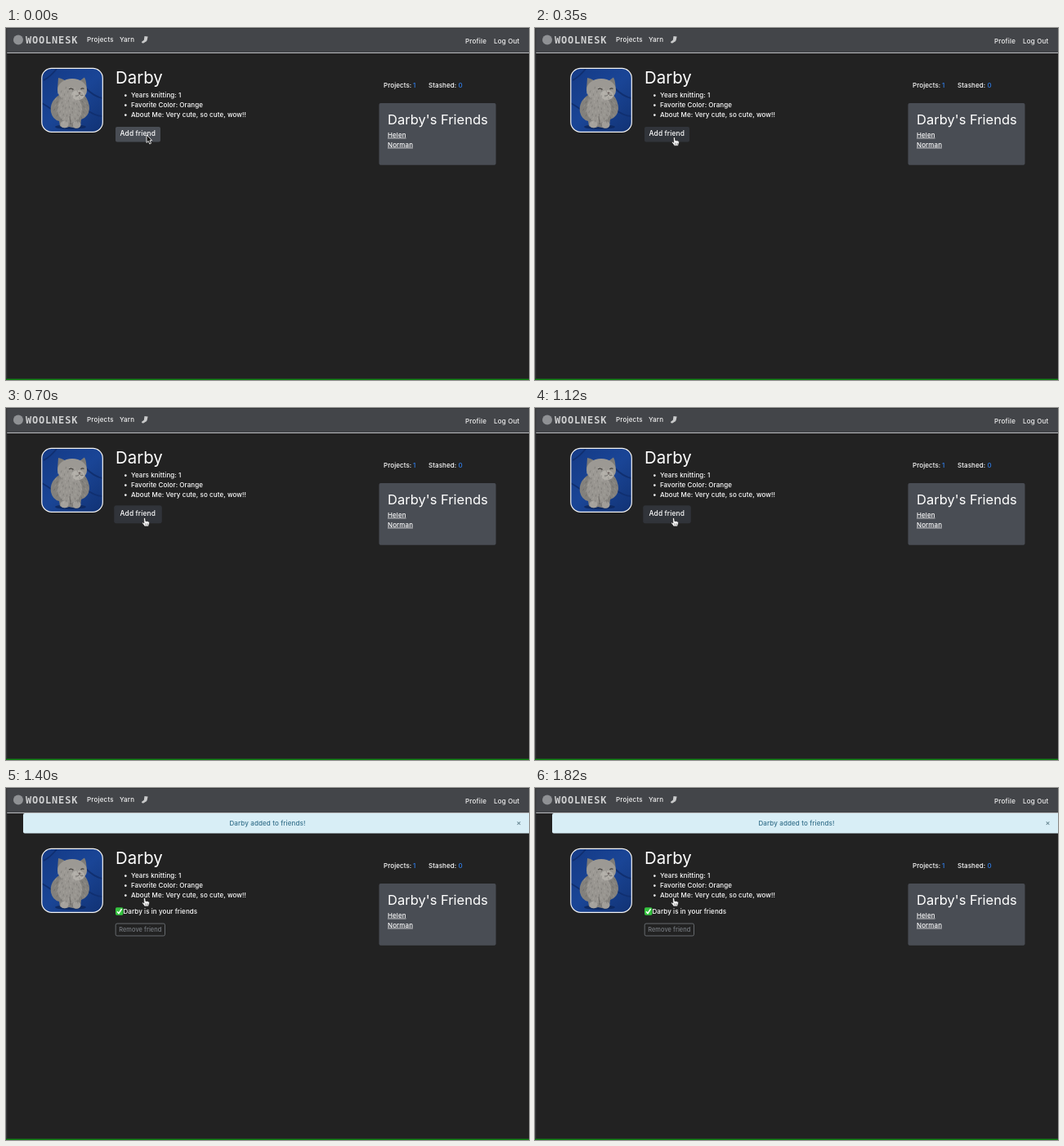
Animation, 640 px wide and 431 px high, one loop 1.89 s. Source, as an HTML page with a canvas:

```html
<!DOCTYPE html>
<html lang="en">
<head>
<meta charset="utf-8">
<title>Friend request</title>
<style>
html, body { margin: 0; width: 100%; height: 100%; overflow: hidden; background: #222; }
canvas { position: fixed; left: 0; top: 0; width: 640px; height: 431px; }
</style>
</head>
<body>
<canvas id="stage"></canvas>
<script>
const W = 640, H = 431, LOOP = 1890, STEP = 70;
const HOVER = 70, PRESS = 630, ADDED = 1190;
const NAME = 'Darby', FRIENDS = ['Helen', 'Norman'];
const SANS = 'Inter, "Open Sans", sans-serif';
const canvas = document.getElementById('stage');
const ctx = canvas.getContext('2d');
const dpr = window.devicePixelRatio || 1;
canvas.width = W * dpr;
canvas.height = H * dpr;

function rect(x, y, w, h, fill) {
  ctx.fillStyle = fill;
  ctx.fillRect(x, y, w, h);
}

function box(x, y, w, h, r, fill, stroke, line = 1) {
  ctx.beginPath();
  ctx.roundRect(x, y, w, h, r);
  if (fill) { ctx.fillStyle = fill; ctx.fill(); }
  if (stroke) { ctx.strokeStyle = stroke; ctx.lineWidth = line; ctx.stroke(); }
}

function oval(x, y, rx, ry, fill, turn = 0) {
  ctx.beginPath();
  ctx.ellipse(x, y, rx, ry, turn, 0, Math.PI * 2);
  ctx.fillStyle = fill;
  ctx.fill();
}

function shape(d, fill, stroke, line = 1) {
  const path = new Path2D(d);
  if (fill) { ctx.fillStyle = fill; ctx.fill(path); }
  if (stroke) { ctx.strokeStyle = stroke; ctx.lineWidth = line; ctx.stroke(path); }
}

function text(str, x, y, { size = 8, color = '#fff', align = 'left', weight = 500, family = SANS, gap = 0.08 } = {}) {
  ctx.font = `${weight} ${size}px ${family}`;
  ctx.letterSpacing = gap + 'px';
  ctx.textAlign = align;
  ctx.fillStyle = color;
  ctx.fillText(str, x, y);
  return ctx.measureText(str).width;
}

function navbar() {
  rect(0, 0, W, 30, '#434549');
  rect(0, 0, W, 1, '#36383b');
  rect(0, 30, W, 1, '#b9bbbd');
  oval(15, 14.5, 6, 6, '#8f9194');
  text('WOOLNESK', 24, 18.5, { size: 12, weight: 700, color: '#cfd0d1', family: '"DejaVu Sans Mono", monospace', gap: 0.8 });
  const link = { gap: 0.2, color: '#f2f2f2' };
  text('Projects', 99, 17, link);
  text('Yarn', 139, 17, link);
  text('Profile', 562, 19, link);
  text('Log Out', 597, 19, link);
  shape('M169.5 10 L173.6 10.6 L172.6 15 Q172.3 16.4 170.6 17.1 L168.3 18.4 Q166.4 18.9 166 17.5 Q165.8 16.6 167.2 16 L168.8 14.8 Z', '#c9cacb');
}

function photo() {
  const frame = [43.8, 49.4, 74.5, 77.9, 12];
  ctx.save();
  ctx.beginPath();
  ctx.roundRect(...frame);
  ctx.clip();
  const cloth = ctx.createLinearGradient(44, 49, 118, 127);
  cloth.addColorStop(0, '#143a86');
  cloth.addColorStop(0.5, '#1a4596');
  cloth.addColorStop(1, '#113274');
  rect(43, 49, 77, 80, cloth);
  shape('M44 92 Q58 100 70 112 M98 74 Q108 84 118 86 M96 98 Q108 108 118 108 M46 64 Q54 60 62 50', null, '#102f70', 2);

  oval(79, 121, 19, 3, '#0e2a63');
  shape('M65 82 Q53 90 55 103 Q57 112 65 114 L66 120 Q71 124 77 121 L82 122 Q88 124 91 120 L92 112 Q101 109 102 99 Q102 90 96 82 Z', '#83817d');
  oval(78, 99, 15, 17, '#989590');
  oval(71.5, 118, 5, 4.2, '#a5a29d');
  oval(86.5, 118.5, 5, 4.2, '#a09d98');
  shape('M63 75 L64 61 Q70 62 76 67 Z M87 67 L96 60.5 Q99 66 98.5 76 Z', '#7d7b77');
  oval(81, 76, 18, 14, '#9c9994');
  oval(88, 82, 8, 6, '#b2afa9');

  // short fur strokes
  for (let i = 0; i < 90; i++) {
    const a = i * 2.4, r = Math.sqrt(i / 90);
    const x = 79 + 20 * r * Math.cos(a), y = 94 + 24 * r * Math.sin(a);
    shape(`M${x} ${y} l${(x - 79) / 12} 2.6`, null, i % 2 ? 'rgba(60,58,55,.3)' : 'rgba(220,217,210,.22)', 0.8);
  }
  shape('M77 75 Q80 73 82.5 75.5 M91.5 75 Q93.5 73 95.5 74.5', null, '#45433f', 1.3);
  oval(90, 79.5, 1.5, 1, '#665b59');
  shape('M90 80.5 Q88.5 84 85.5 83 M90 80.5 Q91.5 84 94.5 82.5 M78 108 L79 118', null, '#62605c', 0.8);
  ctx.restore();
  box(...frame, null, '#f3f3f3', 1.2);
}

function profile() {
  photo();
  text(NAME, 134, 68, { size: 20.4, weight: 400, gap: 0 });
  ['Years knitting: 1', 'Favorite Color: Orange', 'About Me: Very cute, so cute, wow!!'].forEach((line, i) => {
    const y = 85 + i * 12;
    oval(146.3, y - 2.4, 1.3, 1.3, '#fff');
    text(line, 153, y);
  });
  text('Projects:', 462, 72.7);
  text('1', 498, 72.7, { color: '#2f7de8' });
  text('Stashed:', 517, 72.7);
  text('0', 553.5, 72.7, { color: '#2f7de8' });

  box(456.5, 92, 143, 75.7, 2, '#494d54');
  text(NAME + "'s Friends", 467, 117.6, { size: 16.5, weight: 400, gap: 0 });
  FRIENDS.forEach((friend, i) => {
    const y = 133.6 + i * 12;
    rect(467, y + 1, text(friend, 467, y), 0.7, '#fff');
  });
}

function clamp(v) {
  return Math.min(1, Math.max(0, v));
}

function mix(a, b, k) {
  return `rgb(${a.map((v, i) => Math.round(v + (b[i] - v) * k))})`;
}

function addButton(t) {
  const hover = clamp((t - HOVER + STEP) / 150);
  const ring = 1.8 * clamp((t - PRESS + STEP) / 140);
  if (ring) box(134 - ring, 121 - ring, 55 + 2 * ring, 18.5 + 2 * ring, 3, '#303339');
  box(134, 121, 55, 18.5, 2, mix([73, 77, 84], [49, 52, 58], hover));
  text('Add friend', 161.3, 132.4, { size: 8.4, align: 'center', gap: 0.12 });
}

function added() {
  box(21, 31, 630, 24.5, 2, '#d8eef6');
  text(NAME + ' added to friends!', 320, 46, { color: '#35708b', align: 'center', gap: 0.12 });
  text('×', 627.5, 46, { color: '#5f7f8c', align: 'center', size: 9 });
  box(134, 146.3, 9.4, 9.4, 1.6, '#35c43f');
  shape('M136 151.2 L138 153.5 L141.6 148', null, '#fff', 1.4);
  text(NAME + ' is in your friends', 143.5, 154);
  box(134.2, 166, 60.3, 15, 1.8, null, '#777b80', 0.8);
  text('Remove friend', 164.3, 175.8, { size: 7.4, color: '#777b80', align: 'center' });
}

function pointer(t) {
  const k = clamp(t / 560);
  ctx.save();
  ctx.lineJoin = 'round';
  if (t < HOVER) {
    ctx.translate(172, 131);
    shape('M0 0 L0 9.4 L2.2 7.4 L3.8 11 L5.5 10.2 L4 6.8 L6.8 6.6 Z', '#161616', '#f2f2f2', 0.9);
  } else {
    ctx.translate(171.8 - 2.3 * k, 132.4 + 2 * k);
    ctx.scale(1.05, 1.05);
    shape('M-1 .8 Q0 -.7 1 .8 L1.4 4 Q2.5 3.2 3.2 4.2 Q4.2 3.6 4.7 4.7 Q5.8 4.5 5.8 5.8 L5.3 8 L4.6 10 L0 10 Q-1.2 8 -2.8 6.3 Q-3 4.8 -1.6 5.4 L-.6 6.3 Z', '#fafafa', '#1c1c1c', 0.7);
    shape('M1 6.6 L1.2 8.8 M2.5 6.6 L2.6 8.8 M4 6.6 L3.9 8.8', null, '#555', 0.5);
  }
  ctx.restore();
}

function draw(t) {
  ctx.setTransform(dpr, 0, 0, dpr, 0, 0);
  rect(0, 0, W, H, '#222');
  navbar();
  const done = t >= ADDED;
  ctx.save();
  if (done) ctx.translate(0, 25);
  profile();
  ctx.restore();
  if (done) added();
  else addButton(t);
  rect(0, 0, 1.3, H, '#38393b');
  rect(0, 429, W, 1, '#1f4a22');
  rect(0, 430, W, 1, '#0c850f');
  pointer(t);
}

const start = performance.now();
function tick() {
  const t = (performance.now() - start) % LOOP;
  draw(Math.floor(t / STEP) * STEP);
  requestAnimationFrame(tick);
}
tick();
</script>
</body>
</html>
```
